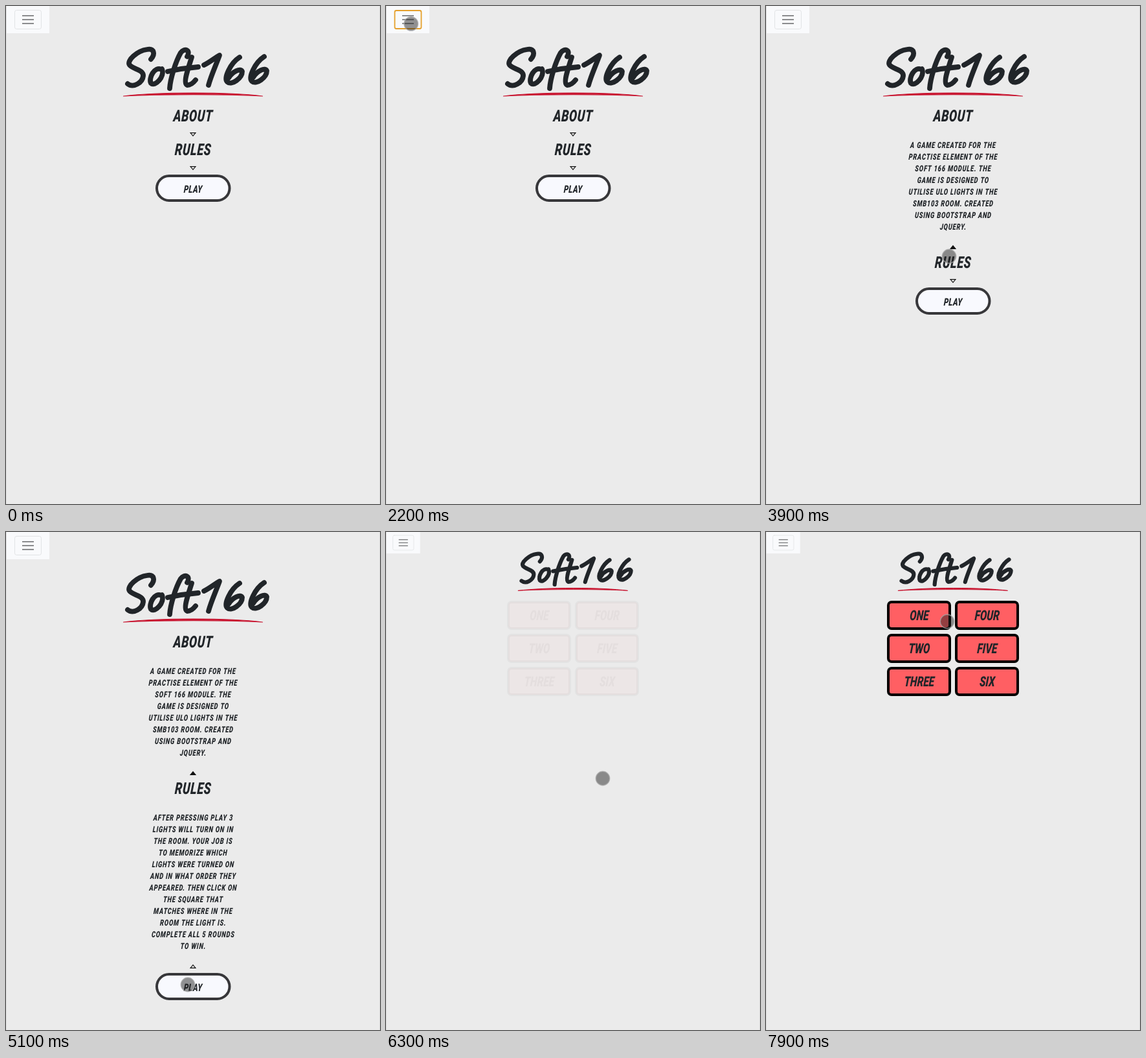
Recreate the animation shown at these times as an HTML page with a canvas. Size 578x768 px, loop 8 s.

```html
<!DOCTYPE html>
<html lang="en">
<head>
<meta charset="utf-8">
<title>Soft166</title>
<style>
  html, body { margin: 0; width: 100%; height: 100%; overflow: hidden; background: #ebebeb; }
  canvas { display: block; width: 578px; height: 768px; }
</style>
</head>
<body>
<canvas id="stage" width="578" height="768" aria-label="Soft166 memory game"></canvas>
<script>
const ctx = document.getElementById('stage').getContext('2d');
const LOOP = 8000, MID = 289, INK = '#212529';
const CONDENSE = 0.72, SLANT = -0.07;

const ABOUT_AT = 3100, RULES_AT = 4150, BOARD_AT = 6000;
const SLIDE = 400;
const FADE_AT = 6160, FADE = 1150;

const ABOUT = [
  'A GAME CREATED FOR THE', 'PRACTISE ELEMENT OF THE', 'SOFT 166 MODULE. THE',
  'GAME IS DESIGNED TO', 'UTILISE ULO LIGHTS IN THE', 'SMB103 ROOM. CREATED',
  'USING BOOTSTRAP AND', 'JQUERY.'
];
const RULES = [
  'AFTER PRESSING PLAY 3', 'LIGHTS WILL TURN ON IN', 'THE ROOM. YOUR JOB IS',
  'TO MEMORIZE WHICH', 'LIGHTS WERE TURNED ON', 'AND IN WHAT ORDER THEY',
  'APPEARED. THEN CLICK ON', 'THE SQUARE THAT', 'MATCHES WHERE IN THE',
  'ROOM THE LIGHT IS.', 'COMPLETE ALL 5 ROUNDS', 'TO WIN.'
];
const CELLS = ['ONE', 'TWO', 'THREE', 'FOUR', 'FIVE', 'SIX'];

// pointer stops: time, x, y
const POINTER = [
  [100, 592, 290], [900, 107, 74], [1100, 32, 24], [2150, 32, 24],
  [2600, 247, 133], [2700, 247, 133], [2950, 292, 196], [3450, 292, 196],
  [3900, 283, 386], [4100, 286, 420], [4520, 286, 420], [4800, 212, 560],
  [5100, 281, 698], [5600, 281, 698], [6300, 335, 380], [6800, 300, 190],
  [7250, 282, 120], [7900, 280, 138], [8000, 280, 138]
];

const SIX = 'M361 79C347 88 336 111 342 117C349 123 365 111 365 101C363 95 350 101 344 111';
const LETTERS = [
  'M224 82C231 74 229 65 218 67C203 69 186 84 191 91C197 98 213 98 212 108C211 118 197 127 188 120',
  'M241 98C229 92 220 112 224 119C230 125 246 109 241 97',
  'M280 78C286 68 276 64 270 72C262 86 254 112 253 127',
  'M287 79C282 95 273 119 280 122C286 122 290 118 293 114',
  'M250 101C268 97 284 95 297 94',
  'M306 91C316 86 324 79 330 76C325 90 317 107 313 122',
  SIX
].map(d => new Path2D(d));
const SECOND_SIX = new Path2D(SIX);
const SWOOSH = new Path2D('M181.5 139C235 132.3 345 132.3 396.5 139C345 136 235 136 181.5 139Z');

const clamp = v => Math.min(1, Math.max(0, v));
const swing = v => 0.5 - Math.cos(Math.PI * clamp(v)) / 2;

function group(draw, dx = 0, dy = 0, scale = 1) {
  ctx.save();
  ctx.translate(dx, dy);
  ctx.scale(scale, scale);
  draw();
  ctx.restore();
}

function lettering(str, x, y, size, weight = 900, gap = size * 0.035) {
  ctx.save();
  ctx.translate(x, y);
  ctx.transform(CONDENSE, 0, SLANT, 1, 0, 0);
  ctx.font = `italic ${weight} ${size}px Roboto, "Liberation Sans", sans-serif`;
  ctx.letterSpacing = gap + 'px';
  ctx.textAlign = 'center';
  ctx.fillStyle = INK;
  ctx.fillText(str, gap / 2, size * 0.356);
  ctx.restore();
}

function box(x, y, w, h, r, line, width, fill) {
  ctx.beginPath();
  ctx.roundRect(x, y, w, h, r);
  if (fill) { ctx.fillStyle = fill; ctx.fill(); }
  ctx.lineWidth = width;
  ctx.strokeStyle = line;
  ctx.stroke();
}

function nav(focused) {
  ctx.fillStyle = '#f9fafc';
  ctx.fillRect(1, 0, 66, 42);
  box(13.5, 6.5, 41, 29, 3, '#e1e3e5', 1);
  ctx.fillStyle = '#8b8c8e';
  for (let y = 14; y < 30; y += 6) ctx.fillRect(25, y, 18, 2);
  if (focused) box(13.5, 7, 41, 28, 2.5, '#e5a02c', 1.8);
}

function title() {
  ctx.lineCap = ctx.lineJoin = 'round';
  ctx.lineWidth = 7.8;
  ctx.strokeStyle = INK;
  LETTERS.forEach(p => ctx.stroke(p));
  group(() => ctx.stroke(SECOND_SIX), 38, -1);
  ctx.lineWidth = 1.2;
  ctx.fillStyle = ctx.strokeStyle = '#c8142f';
  ctx.fill(SWOOSH);
  ctx.stroke(SWOOSH);
}

function arrow(y, up, solid) {
  const d = up ? -1 : 1;
  ctx.beginPath();
  ctx.moveTo(MID - 4, y - 2.4 * d);
  ctx.lineTo(MID + 4, y - 2.4 * d);
  ctx.lineTo(MID, y + 2.4 * d);
  ctx.closePath();
  ctx.lineJoin = 'miter';
  ctx.lineWidth = 1.1;
  ctx.strokeStyle = ctx.fillStyle = '#111';
  if (solid) ctx.fill();
  ctx.stroke();
}

function paragraph(lines, top, height) {
  if (height <= 0) return;
  ctx.save();
  ctx.beginPath();
  ctx.rect(0, top, 578, height);
  ctx.clip();
  lines.forEach((s, i) => lettering(s, MID, top + 28 + 18 * i, 13, 800, 1.15));
  ctx.restore();
}

function menuPage(t) {
  const a = 174 * swing((t - ABOUT_AT) / SLIDE);
  const b = 246 * swing((t - RULES_AT) / SLIDE);
  nav(t >= 1200 && t < ABOUT_AT);
  title();
  lettering('ABOUT', MID, 169, 25);
  paragraph(ABOUT, 186, a);
  arrow(198 + a, t >= ABOUT_AT, t >= ABOUT_AT);
  lettering('RULES', MID, 221 + a, 25);
  paragraph(RULES, 238 + a, b);
  arrow(250 + a + b, t >= RULES_AT, false);
  box(233, 262 + a + b, 112.5, 38, 19, '#37373a', 4, '#f8f9fe');
  lettering('PLAY', MID, 282 + a + b, 16);
}

function boardPage(t) {
  group(() => nav(false), 0, 0, 0.787);
  group(title, 61.5, -19, 0.787);
  ctx.save();
  ctx.globalAlpha = swing((t - FADE_AT) / FADE);
  CELLS.forEach((name, i) => {
    const x = 189 + 105 * Math.floor(i / 3), y = 108 + 51 * (i % 3);
    box(x, y, 95, 41, 5, '#000', 4, '#ff5f63');
    lettering(name, x + 48, y + 20.5, 21.5, 900, 0);
  });
  ctx.restore();
}

function pointer(t) {
  const n = POINTER.findIndex(p => p[0] > t);
  if (n < 1) return;
  const [t0, x0, y0] = POINTER[n - 1], [t1, x1, y1] = POINTER[n];
  const k = swing((t - t0) / (t1 - t0));
  ctx.beginPath();
  ctx.arc(x0 + (x1 - x0) * k, y0 + (y1 - y0) * k, 10.7, 0, 7);
  ctx.fillStyle = 'rgba(30,30,30,.48)';
  ctx.fill();
  ctx.lineWidth = 1.4;
  ctx.strokeStyle = 'rgba(165,165,165,.75)';
  ctx.stroke();
}

function frame(now) {
  const t = now % LOOP;
  ctx.fillStyle = '#ebebeb';
  ctx.fillRect(0, 0, 578, 768);
  ctx.fillStyle = '#dedede';
  ctx.fillRect(0, 0, 1, 768);
  ctx.fillRect(577, 0, 1, 768);
  if (t < BOARD_AT) menuPage(t);
  else boardPage(t);
  pointer(t);
  requestAnimationFrame(frame);
}
requestAnimationFrame(frame);
</script>
</body>
</html>
```
